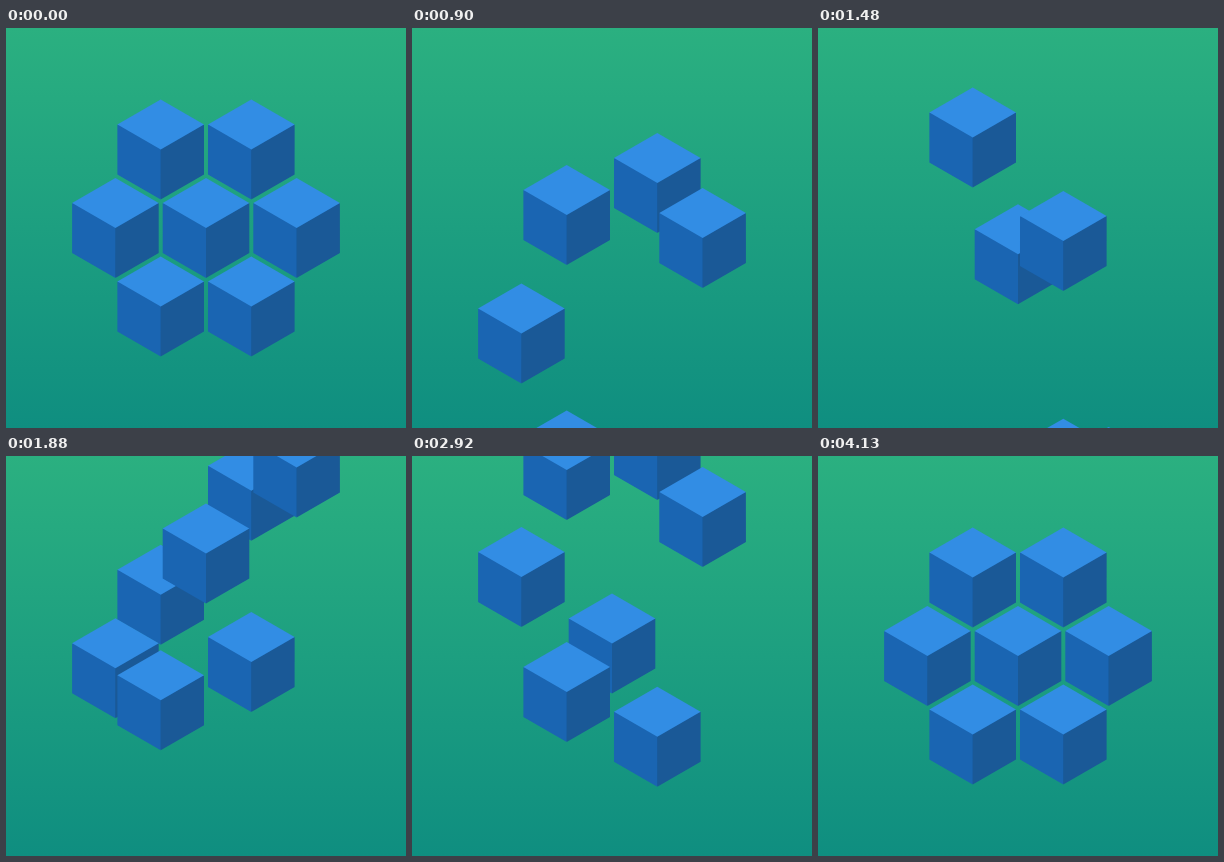
An HTML page with a canvas for the animation above (4160 ms loop, 400 by 400 pixels).

```html
<!DOCTYPE html>
<html lang="en">
<head>
<meta charset="utf-8">
<title>Bouncing cubes</title>
<style>
  html, body { margin: 0; width: 100%; height: 100%; overflow: hidden; background: #1fa080; }
  canvas { display: block; width: 400px; height: 400px; }
</style>
</head>
<body>
<canvas id="stage" width="400" height="400"></canvas>
<script>
const ctx = document.getElementById('stage').getContext('2d');
const LOOP = 4160, STEP = 20.8, HOLD = 230;
const R = 50, W = R * Math.sqrt(3) / 2;      // cube radius and half width
const GAP = 90.6, ROW = GAP * Math.sqrt(3) / 2;
const STAGGER = 5;                           // steps between cubes

// column, row, place in the spiral; listed back to front
const cubes = [
  [-0.5, -1, 4], [0.5, -1, 5],
  [-1, 0, 3], [0, 0, 0], [1, 0, 6],
  [-0.5, 1, 2], [0.5, 1, 1]
];

const sky = ctx.createLinearGradient(0, 0, 0, 400);
sky.addColorStop(0, '#2bb080');
sky.addColorStop(1, '#0f8e80');

const arc = (m, peak, height) => (m - peak) ** 2 / 6 - height;

// Soft landing: enters at speed vin, leaves upwards at speed vout
function dip(m, from, to, vin, vout) {
  const d = to - from, s = (m - from) / d;
  return d * s * (1 - s) * ((1 - s) * vin + s * vout);
}

// Vertical offset of a cube after m steps of its own clock
function offset(m) {
  if (m <= 10) return 0;
  if (m < 68.97) {
    const y = arc(m, 1.4, 12.4);
    return y > 400 ? y - 748.5 : y;          // leaves below, returns above
  }
  if (m < 76.26) return dip(m, 68.97, 76.26, 21, 9.75);
  if (m < 134.74) return arc(m, 105.5, 142.5);
  if (m < 137.3) return dip(m, 134.74, 137.3, 9.75, 5.07);
  if (m < 167.7) return arc(m, 152.5, 38.5);
  return 0;
}

function face(color, points) {
  ctx.fillStyle = color;
  ctx.beginPath();
  for (const [x, y] of points) ctx.lineTo(x, y);
  ctx.fill();
}

function drawCube(x, y) {
  const l = x - W, r = x + W, h = R / 2;
  // an inset hexagon hides the seams between the faces
  face('#1a5fa5', [[x, y - R + 1], [r - 1, y - h], [r - 1, y + h], [x, y + R - 1], [l + 1, y + h], [l + 1, y - h]]);
  face('#1a65b2', [[l, y - h], [x, y], [x, y + R], [l, y + h]]);
  face('#1a5997', [[r, y - h], [x, y], [x, y + R], [r, y + h]]);
  face('#328de4', [[x, y - R], [r, y - h], [x, y], [l, y - h]]);
}

function draw(now) {
  const t = now % LOOP;
  const n = t < HOLD ? 0 : 11 + Math.floor((t - HOLD + 3) / STEP);
  ctx.fillStyle = sky;
  ctx.fillRect(0, 0, 400, 400);
  for (const [col, row, order] of cubes) {
    drawCube(200 + col * GAP, 200 + row * ROW + offset(n - order * STAGGER));
  }
}

const start = performance.now();
function tick() {
  draw(performance.now() - start);
  requestAnimationFrame(tick);
}
tick();
</script>
</body>
</html>
```
